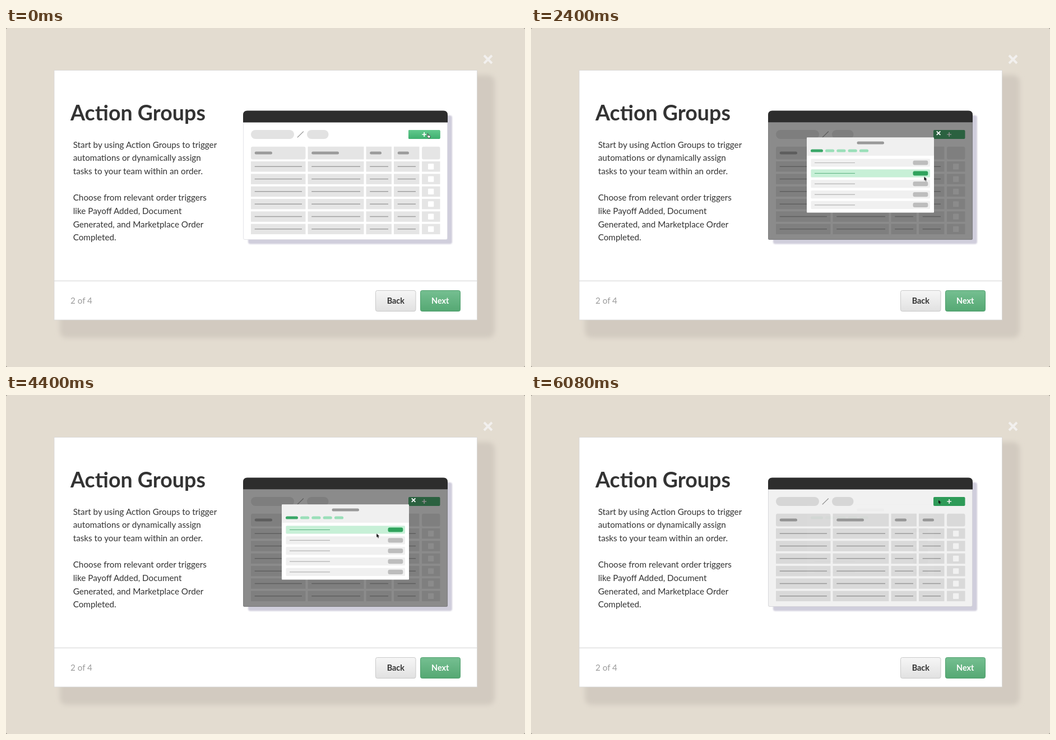
Recreate the animation shown at these times as an HTML page. Size 926 by 605 pixels, loop 6120 ms.

```html
<!DOCTYPE html>
<html lang="en">
<head>
<meta charset="utf-8">
<title>Action Groups</title>
<style>
html, body { margin: 0; width: 100%; height: 100%; overflow: hidden; background: #77736c; }
svg { display: block; width: 926px; height: 605px; font-family: Lato, Carlito, sans-serif; }
.move, .hand, .arrow, .dim, .modal, .hover, .rows, .active { animation: 6120ms linear infinite; }
.dim { animation-name: dim; }
.modal { animation-name: modal; }
.hover { animation-name: hover; }
.move { animation-name: move; }
.hand { animation-name: hand; animation-timing-function: step-end; }
.arrow { animation-name: arrow; animation-timing-function: step-end; }
.rows { animation-name: settle; animation-timing-function: step-end; }
.active { animation-name: active; animation-timing-function: step-end; }

@keyframes dim {
  0%, 5.5% { opacity: 0; }
  9.8% { opacity: .41; }
  14.7%, 91.5% { opacity: 1; }
  100% { opacity: .05; }
}
@keyframes modal {
  0%, 5.5% { opacity: 0; }
  9.8% { opacity: .41; }
  14.7%, 91.5% { opacity: 1; }
  99.7%, 100% { opacity: 0; }
}
@keyframes hover {
  0%, 6% { opacity: 1; }
  14.7%, 100% { opacity: 0; }
}
@keyframes move {
  0%, 20.5% { transform: translate(751px, 188px); animation-timing-function: ease-in-out; }
  32% { transform: translate(708px, 238px); }
  49.67% { transform: translate(692px, 305px); animation-timing-function: ease-out; }
  52.5%, 56% { transform: translate(691px, 314px); }
  72% { transform: translate(661px, 247px); }
  76% { transform: translate(664px, 243px); animation-timing-function: ease-in-out; }
  86.5%, 90.2% { transform: translate(729px, 191px); }
  94%, 100% { transform: translate(726.5px, 187px); }
}
@keyframes hand {
  0% { opacity: 1; }
  6% { opacity: 0; }
  86.6% { opacity: 1; }
  92.3%, 100% { opacity: 0; }
}
@keyframes arrow {
  0% { opacity: 0; }
  6% { opacity: 1; }
  86.6% { opacity: 0; }
  92.3%, 100% { opacity: 1; }
}
@keyframes settle {
  0% { transform: translateY(-.8px); }
  24%, 100% { transform: none; }
}
/* The highlight jumps to the row under the cursor. */
@keyframes active {
  0%, 71.3% { transform: none; opacity: 1; }
  35.2%, 66.7% { transform: translateY(18.85px); }
  40.2%, 62.3% { transform: translateY(37.7px); }
  45.1%, 57.8% { transform: translateY(56.55px); }
  50.2% { transform: translateY(75.4px); }
  78%, 100% { transform: none; opacity: 0; }
}
</style>
</head>
<body>
<svg viewBox="0 0 926 605">
  <defs>
    <linearGradient id="gray" x2="0" y2="1">
      <stop stop-color="#f6f6f6"/><stop offset="1" stop-color="#e1e1e1"/>
    </linearGradient>
    <linearGradient id="green" x2="0" y2="1">
      <stop stop-color="#75bf91"/><stop offset="1" stop-color="#55a873"/>
    </linearGradient>
    <linearGradient id="lit" x2="0" y2="1">
      <stop stop-color="#62c98d"/><stop offset="1" stop-color="#3fb06f"/>
    </linearGradient>
    <filter id="soft" x="-5%" y="-5%" width="110%" height="110%"><feGaussianBlur stdDeviation="4"/></filter>
    <filter id="edge"><feGaussianBlur stdDeviation="1"/></filter>
  </defs>

  <rect width="926" height="605" rx="3" fill="#e3dcd0"/>
  <rect x="96" y="84" width="776" height="469" rx="12" fill="#d2cac0" filter="url(#soft)"/>
  <path d="M853 49L867 63M867 49L853 63" stroke="#f2f0ee" stroke-width="4"/>
  <rect x="86" y="75.5" width="754.5" height="445.5" fill="#fff" stroke="#d8d8d8" stroke-width=".8"/>
  <path d="M86 451.3H840" stroke="#dadada" stroke-width="1.2"/>

  <text x="115" y="165" font-size="37.6" font-weight="700" fill="#333">Action Groups</text>
  <g id="copy" font-size="15.25" fill="#333"></g>
  <text x="115" y="492.3" font-size="15.2" fill="#9b9b9b">2 of 4</text>

  <rect x="659.5" y="468.5" width="71.5" height="37" rx="3" fill="url(#gray)" stroke="#c9c9c9"/>
  <rect x="739.5" y="468.5" width="71" height="37" rx="3" fill="url(#green)" stroke="#4f9f6d"/>
  <g font-size="14.4" font-weight="700" text-anchor="middle">
    <text x="695.3" y="492" fill="#333">Back</text>
    <text x="774.7" y="492" fill="#fff">Next</text>
  </g>

  <rect x="432" y="156" width="364" height="229.5" rx="4" fill="#d0cedc" filter="url(#edge)"/>
  <path d="M423.5 168H787.5V375Q787.5 377.5 785 377.5H426Q423.5 377.5 423.5 375Z" fill="#fff" stroke="#dedee2" stroke-width=".8"/>
  <path d="M423 168.5V155Q423 147.5 430.5 147.5H780.5Q788 147.5 788 155V168.5Z" fill="#2d2d2d"/>
  <g id="page"></g>
  <rect x="718" y="182" width="56.5" height="16" rx="2" fill="#2fa35c"/>
  <rect class="hover" x="718" y="182" width="56.5" height="16" rx="2" fill="url(#lit)"/>
  <path d="M742.3 190H750.1M746.2 186.1V193.9" stroke="#fff" stroke-width="1.7"/>

  <path class="dim" d="M423 168.5H788V375.5Q788 378 785.5 378H425.5Q423 378 423 375.5Z" fill="#2a2a2a" fill-opacity=".54"/>
  <g class="modal">
    <rect x="492" y="195.5" width="227" height="134" rx="1" fill="#fff"/>
    <rect x="492" y="195.5" width="227" height="32.5" rx="1" fill="#f0f0f0"/>
    <path d="M723.8 184.3L730.4 190.9M730.4 184.3L723.8 190.9" stroke="#fff" stroke-width="1.9"/>
    <g id="tabs"></g>
    <g class="rows" id="rows"></g>
  </g>

  <g class="move">
    <path class="arrow" d="M0 0V6.6L1.6 5.3 2.8 8 4 7.4 2.9 4.9 5 4.7Z" fill="#111"/>
    <path class="hand" d="M.7 .8Q1.5 0 2.2 .9V3.4L5.4 4.1Q6.4 4.4 6.1 5.8L5.5 8.2H2.5L.2 5.4Q.4 4.4 1.1 5Z" fill="#fff" stroke="#222" stroke-width=".8"/>
  </g>
</svg>
<script>
const fill = (id, parts) => { document.getElementById(id).innerHTML = parts.join(''); };
const box = (x1, x2, y, h, color, r = 0) =>
  `<rect x="${x1}" y="${y}" width="${x2 - x1}" height="${h}" rx="${r}" fill="${color}"/>`;
const line = (x1, x2, y, color, w) =>
  `<path d="M${x1} ${y}H${x2}" stroke="${color}" stroke-width="${w}"/>`;

const copy = [
  'Start by using Action Groups to trigger', 'automations or dynamically assign',
  'tasks to your team within an order.', '', 'Choose from relevant order triggers',
  'like Payoff Added, Document', 'Generated, and Marketplace Order', 'Completed.'
];
fill('copy', copy.map((s, i) => `<text x="119.7" y="${213.8 + i * 23.63}">${s}</text>`));

// Page: breadcrumb and table; a column is [left, right, title end, line end].
const cell = '#e5e5e5';
const page = [
  box(437, 514, 182, 16, '#e2e2e2', 8), box(537, 575.5, 182, 16, '#e2e2e2', 8),
  '<path d="M519.8 195.3L530.8 184.7" stroke="#888" stroke-width="1.1"/>'
];
const columns = [
  [437, 534.5, 475, 528], [538.5, 638.5, 594, 632],
  [642.5, 688, 670, 682], [692, 737.5, 719, 731], [742, 774.5]
];
columns.forEach(([left, right, titleEnd, lineEnd], c) => {
  page.push(box(left, right, 211.7, 22.8, cell, c % 4 ? 0 : 3));
  if (titleEnd) page.push(box(left + 6.7, titleEnd, 220.4, 5, '#9b9b9b', 2.5));
  for (let r = 0; r < 6; r++) {
    const y = 238 + r * 22.32;
    page.push(box(left, right, y, 18.5, cell));
    page.push(lineEnd ? line(left + 6.7, lineEnd, y + 9.2, '#a0a0a0', 1.5)
                      : box(753, 763.3, y + 4.2, 10.2, '#fff', 1));
  }
});
fill('page', page);

const tabs = [box(581.5, 630, 202.5, 5, '#999', 2.5), box(499, 521, 216.4, 5.2, '#3aa768', 2.6)];
for (let i = 0; i < 4; i++) {
  const x = 525 + i * 20.3;
  tabs.push(box(x, x + 16.2, 216.4, 5.2, '#9adfb9', 2.6));
}
fill('tabs', tabs);

const row = (y, band, stroke, pill) =>
  box(499.5, 712, y - 7.1, 14.2, band, 1.5) + line(506, 578, y, stroke, 1.2) +
  box(681.5, 708.3, y - 4.1, 8.2, pill, 3);
const rows = [];
for (let i = 0; i < 5; i++) rows.push(row(240.5 + i * 18.85, '#f0f0f0', '#b3b3b3', '#bdbdbd'));
rows.push(`<g class="active">${row(240.5, '#c7f0d7', '#58b07d', '#2fa35c')}</g>`);
fill('rows', rows);
</script>
</body>
</html>
```
